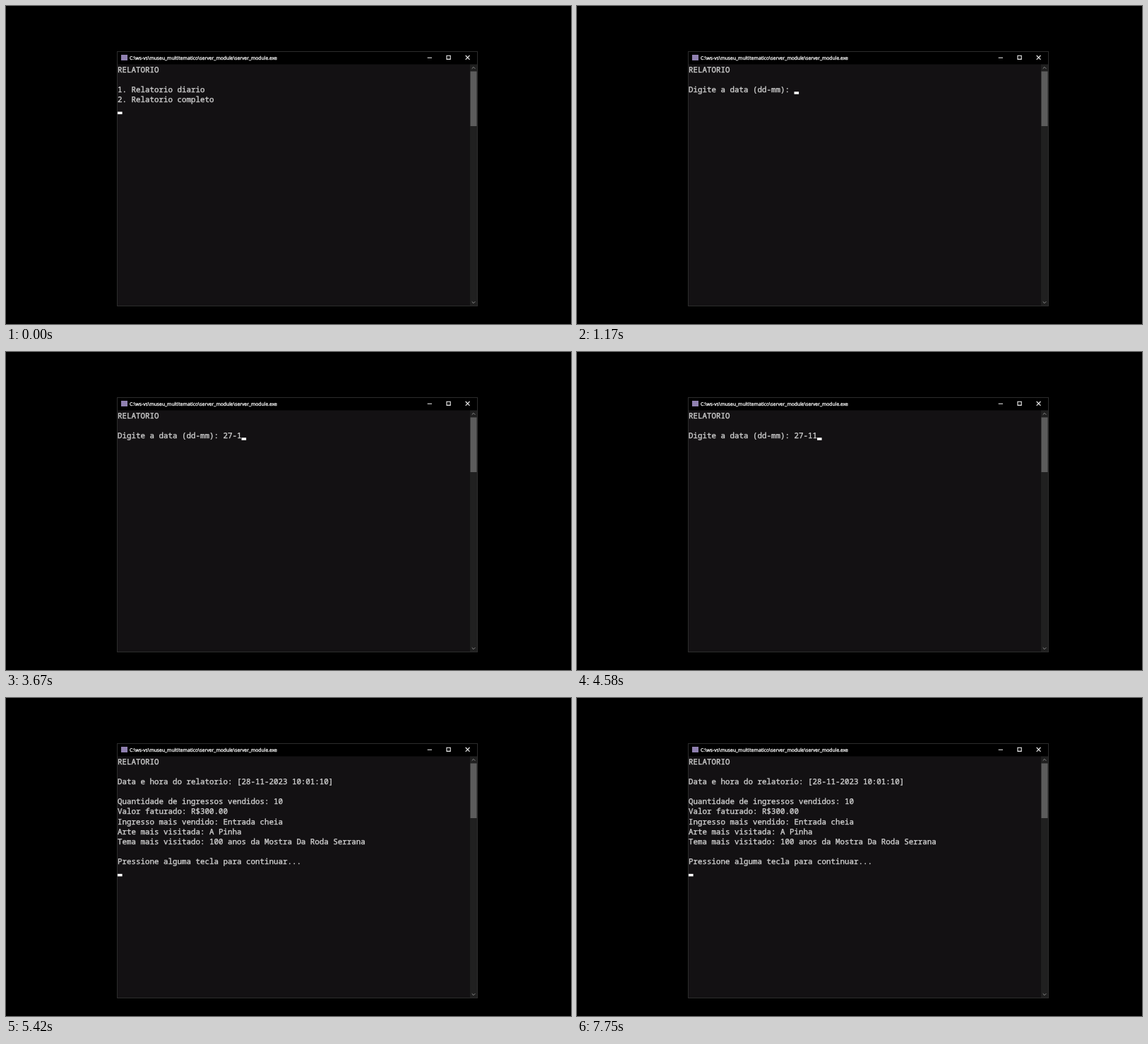
Write an HTML page that moves like this. It is 800x450 px and loops after 8 s.

```html
<!DOCTYPE html>
<html lang="pt">
<head>
<meta charset="utf-8">
<style>
  html, body { margin: 0; width: 100%; height: 100%; overflow: hidden; background: #000; }
  svg { display: block; width: 800px; height: 450px; }
  text { text-rendering: geometricPrecision; white-space: pre; }
  .title { font: 500 6.79px "Open Sans", sans-serif; fill: #fff; stroke: #fff; stroke-width: .3; }
  #screen { font: 500 10.83px "Noto Sans Mono", monospace; fill: #d0d0d0; stroke: #d0d0d0; stroke-width: .35; }
  .line { fill: none; stroke: #f2f2f2; stroke-width: 1.1; }
  .arrow { fill: none; stroke: #8a8a8a; stroke-width: 1; }
</style>
</head>
<body>
<svg viewBox="0 0 800 450">
  <rect x="157.5" y="64.5" width="510" height="360" fill="#000" stroke="#2c2c2c"/>
  <rect x="158" y="82.5" width="499" height="341.5" fill="#131113"/>
  <rect x="657" y="82.5" width="10" height="341.5" fill="#202020"/>
  <rect x="657.5" y="92.5" width="9" height="77.5" fill="#5c5c5c"/>
  <path class="arrow" d="M659.7 88.7l2.3-2.3 2.3 2.3M659.7 418.3l2.3 2.3 2.3-2.3"/>
  <rect x="163" y="69" width="9" height="8" fill="#8f80b0"/>
  <text class="title" x="175" y="75.6">C:\ws-vs\museu_multitematico\server_module\server_module.exe</text>
  <path class="line" d="M596.7 73.2h6.3M624 70.2h5.2v5.2h-5.2zM650.7 70l5.8 5.8m0-5.8l-5.8 5.8"/>
  <g id="screen"></g>
  <rect id="cursor" width="6.6" height="3.5" fill="#fff"/>
</svg>
<script>
const LOOP = 8000, LEFT = 158, BASE = 93.5, COL = 6.5, ROW = 14.18;
const screen = document.getElementById('screen');
const cursor = document.getElementById('cursor');

const menu = ['RELATORIO', '', '1. Relatorio diario', '2. Relatorio completo', ''];
const ask = typed => ['RELATORIO', '', 'Digite a data (dd-mm): ' + typed];
const report = [
  'RELATORIO', '',
  'Data e hora do relatorio: [28-11-2023 10:01:10]', '',
  'Quantidade de ingressos vendidos: 10',
  'Valor faturado: R$300.00',
  'Ingresso mais vendido: Entrada cheia',
  'Arte mais visitada: A Pinha',
  'Tema mais visitado: 100 anos da Mostra Da Roda Serrana', '',
  'Pressione alguma tecla para continuar...', ''
];

// [start ms, lines]; the cursor sits at the end of the last line
const pages = [
  [0, menu],
  [1170, ask('')],
  [2750, ask('2')],
  [2920, ask('27')],
  [3330, ask('27-')],
  [3670, ask('27-1')],
  [3830, ask('27-11')],
  [5250, [...ask('27-11'), '']],
  [5420, report]
];
// spans in which the cursor is hidden
const hidden = [[330, 830], [1920, 2420], [2920, 3330], [3500, 3670],
  [4000, 4580], [5080, 5250], [6080, 6670], [7250, 7750]];

let shown;
function show(lines) {
  if (lines === shown) return;
  shown = lines;
  screen.replaceChildren(...lines.map((line, i) => {
    const t = document.createElementNS('http://www.w3.org/2000/svg', 'text');
    t.setAttribute('x', LEFT);
    t.setAttribute('y', BASE + i * ROW);
    t.textContent = line;
    return t;
  }));
  const last = lines.length - 1;
  cursor.setAttribute('x', LEFT + lines[last].length * COL);
  cursor.setAttribute('y', BASE + last * ROW - 0.6);
}

function frame(now) {
  const t = now % LOOP;
  show(pages.findLast(([start]) => start <= t)[1]);
  const off = hidden.some(([from, to]) => t >= from && t < to);
  cursor.setAttribute('visibility', off ? 'hidden' : 'visible');
  requestAnimationFrame(frame);
}
frame(0);
</script>
</body>
</html>
```
